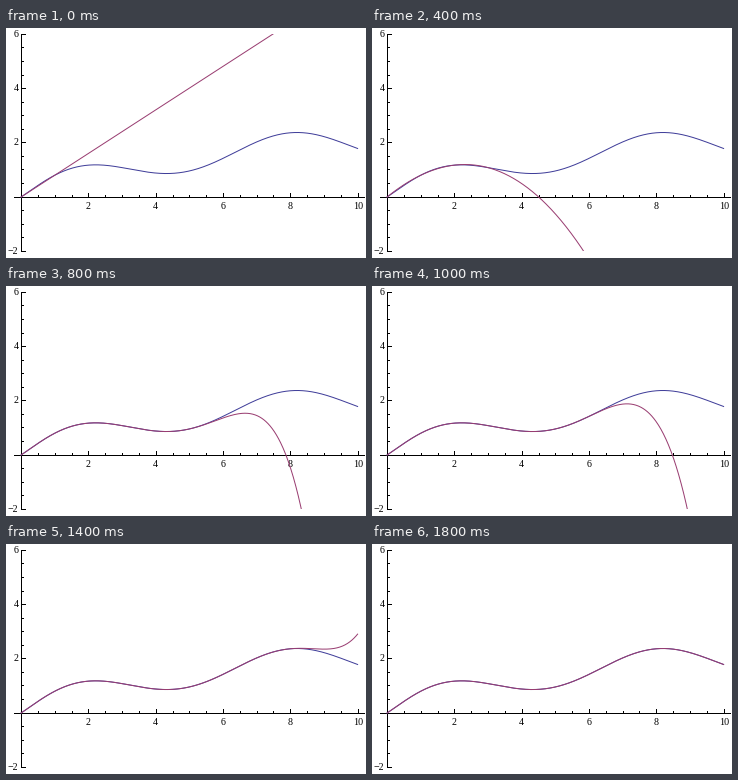
A matplotlib script for the animation above (2000 ms loop, 360x230 px).

```python
import numpy as np
import matplotlib.pyplot as plt
from matplotlib.animation import FuncAnimation
from matplotlib.patches import Rectangle

W, H, DPI = 360, 230, 72
BLUE, RED = "#3f3d99", "#993d71"

# Forward differences of the curve at x = 0, 1, 2, ...
DIFFS = [0.8034, -0.431, -0.0331, 0.3891, -0.3607,
         0.0600, 0.1532, -0.0790, -0.128, 0.160]


def px(x):
    return 15.1 + 33.65 * x


def py(y):
    return 169.0 - 27.1 * y


def newton(x, degree):
    """Newton interpolation through the nodes 0..degree."""
    total, binom = np.zeros_like(x), np.ones_like(x)
    for k, diff in enumerate(DIFFS[:degree]):
        binom = binom * (x - k) / (k + 1)
        total += diff * binom
    return total


fig = plt.figure(figsize=(W / DPI, H / DPI), dpi=DPI, facecolor="white")
ax = fig.add_axes([0, 0, 1, 1])
ax.set_xlim(0, W)
ax.set_ylim(H, 0)
ax.axis("off")

X0, Y0 = 15.5, 169.5


def stroke(xs, ys):
    # Coordinates already sit on pixel centres, so snapping would shift them.
    ax.plot(xs, ys, color="black", lw=1, solid_capstyle="butt",
            snap=False, zorder=1)


def label(x, y, value, align):
    text = str(value).replace("-", "\u2212")
    ax.text(x, y, text, family="Liberation Serif", size=10,
            ha=align, va="baseline")


def tick_size(i):
    return 4.5 if i % 4 == 0 else 2.5


stroke([8, 359], [Y0, Y0])
stroke([X0, X0], [6, 224])

for i in range(1, 21):
    x = np.round(px(i / 2)) + 0.5
    stroke([x, x], [Y0, Y0 - tick_size(i)])
    if i % 4 == 0:
        label(x - 0.8, 181, i // 2, "center")

for i in range(-4, 13):
    if i == 0:
        continue
    y = np.floor(py(i / 2)) + 0.5
    stroke([X0, X0 + tick_size(i)], [y, y])
    if i % 4 == 0:
        label(12.5, y + 2.6, i // 2, "right")

xs = np.linspace(0, 10, 801)
frame = Rectangle((0, 6), W, 217.3, transform=ax.transData)


def curve(color, zorder):
    line, = ax.plot([], [], color=color, lw=1, zorder=zorder)
    line.set_clip_path(frame)
    return line


exact = curve(BLUE, 2)
exact.set_data(px(xs), py(newton(xs, len(DIFFS))))
approx = curve(RED, 3)


def update(i):
    approx.set_data(px(xs), py(newton(xs, i + 1)))
    return approx,


anim = FuncAnimation(fig, update, frames=len(DIFFS), interval=200,
                     repeat=True, repeat_delay=0)
plt.show()
```
